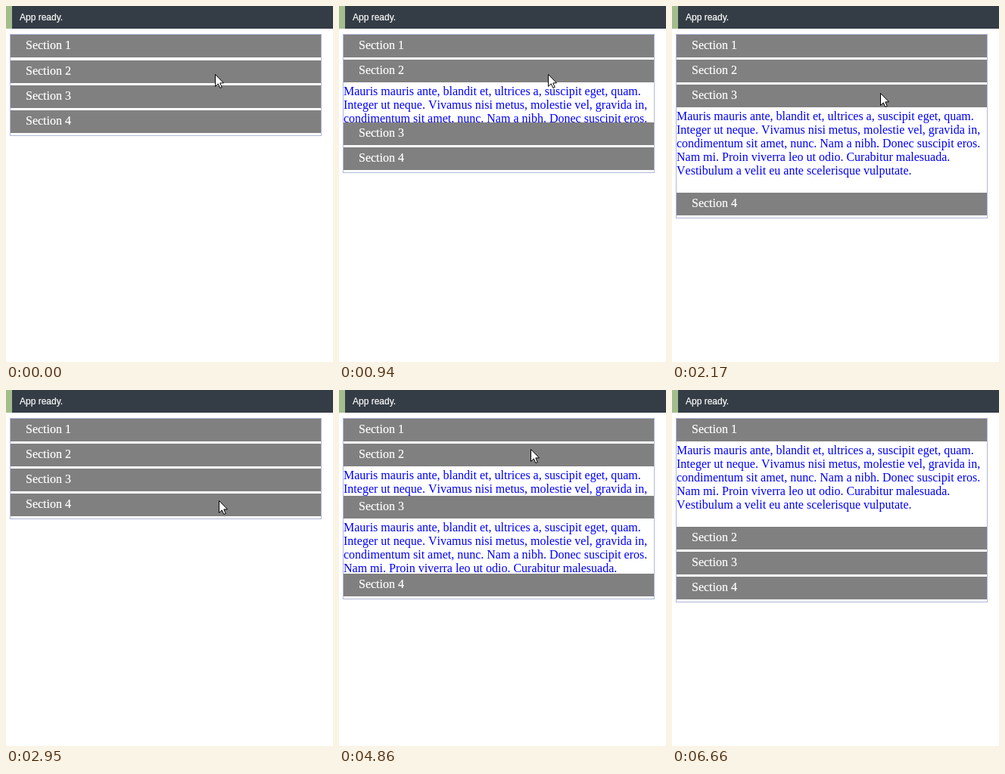
Recreate the animation shown at these times as an HTML page. Size 432 by 471 pixels, loop 8540 ms.

```html
<!DOCTYPE html>
<html lang="en">
<head>
<meta charset="utf-8">
<title>Accordion</title>
<style>
  html, body { margin: 0; width: 100%; height: 100%; overflow: hidden; background: #fff; }
  body {
    position: relative; font: 16px/18px "Liberation Serif", "Times New Roman", serif;
    font-kerning: none;
  }
  #bar, .head { box-sizing: border-box; height: 30px; color: #fff; -webkit-text-stroke: .2px; }
  #bar {
    position: absolute; left: 0; top: 0; width: 100%;
    border-left: 8px solid #a3be8c; padding-left: 10px; background: #343d46;
    font: 12px/30px "Liberation Sans", Arial, sans-serif;
  }
  #accordion { position: absolute; left: 5px; top: 37px; width: 410px; border: 1px solid #b0b8d8; }
  .head { margin-bottom: 3px; padding: 5px 0 0 20px; background: #808080; }
  .panel { height: 0; overflow: hidden; white-space: nowrap; color: #00f; }
  #cursor { position: absolute; left: 0; top: 0; }
</style>
</head>
<body>
<div id="bar">App ready.</div>
<div id="accordion"></div>
<svg id="cursor" width="12" height="19">
  <path d="M.5 .5V16.5L4.3 12.9L6.8 18.5L9.2 17.5L6.8 11.9H11.5Z" fill="#fff" stroke="#000"/>
</svg>
<script>
const LOOP = 8540, STEP = 135, LEAD = 25; // the screen refreshes every STEP ms
const SLIDE = 400, TRAVEL = 260, FULL = 110;
const TEXT = [
  "Mauris mauris ante, blandit et, ultrices a, suscipit eget, quam.",
  "Integer ut neque. Vivamus nisi metus, molestie vel, gravida in,",
  "condimentum sit amet, nunc. Nam a nibh. Donec suscipit eros.",
  "Nam mi. Proin viverra leo ut odio. Curabitur malesuada.",
  "Vestibulum a velit eu ante scelerisque vulputate."
].join("<br>");

// The pointer reaches (x, y) at `arrive`, then its section opens and closes
const VISITS = [
  { section: 1, x: 276, y: 90, arrive: -1000, open: -1000, close: -375 },
  { section: 2, x: 276, y: 90, arrive: 0, open: 160, close: 733 },
  { section: 3, x: 275, y: 115, arrive: 1215, open: 1340, close: 2300 },
  { section: 4, x: 281, y: 146, arrive: 2945, open: 3080, close: 3810 },
  { section: 3, x: 268, y: 126, arrive: 4180, open: 4190, close: 4694 },
  { section: 2, x: 253, y: 78, arrive: 4440, open: 4706, close: 5420 },
  { section: 1, x: 250, y: 53, arrive: 5270, open: 5420, close: LOOP },
  { x: 416, y: 452, arrive: 6600 }
];

const clamp = k => Math.max(0, Math.min(1, k));
const swing = k => 0.5 - Math.cos(Math.PI * clamp(k)) / 2;

const accordion = document.getElementById("accordion");
const cursor = document.getElementById("cursor");
accordion.innerHTML = [1, 2, 3, 4].map(n =>
  `<div class="head">Section ${n}</div><div class="panel">${TEXT}</div>`).join("");
const panels = accordion.querySelectorAll(".panel");

function panelHeight(section, t) {
  let shown = 0;
  for (const visit of VISITS)
    if (visit.section === section)
      shown += swing((t - visit.open) / SLIDE) - swing((t - visit.close) / SLIDE);
  return Math.round(FULL * shown);
}

function pointer(t) {
  let { x, y } = VISITS[0];
  for (const visit of VISITS) {
    const k = clamp((t - visit.arrive) / TRAVEL + 1);
    x += (visit.x - x) * k;
    y += (visit.y - y) * k;
  }
  return [Math.round(x), Math.round(y)];
}

function draw() {
  const t = Math.floor((performance.now() % LOOP + LEAD) / STEP) * STEP;
  panels.forEach((panel, i) => panel.style.height = panelHeight(i + 1, t) + "px");
  const [x, y] = pointer(t);
  cursor.style.transform = `translate(${x}px, ${y}px)`;
  cursor.style.visibility = t < VISITS[VISITS.length - 1].arrive ? "visible" : "hidden";
  requestAnimationFrame(draw);
}
draw();
</script>
</body>
</html>
```
